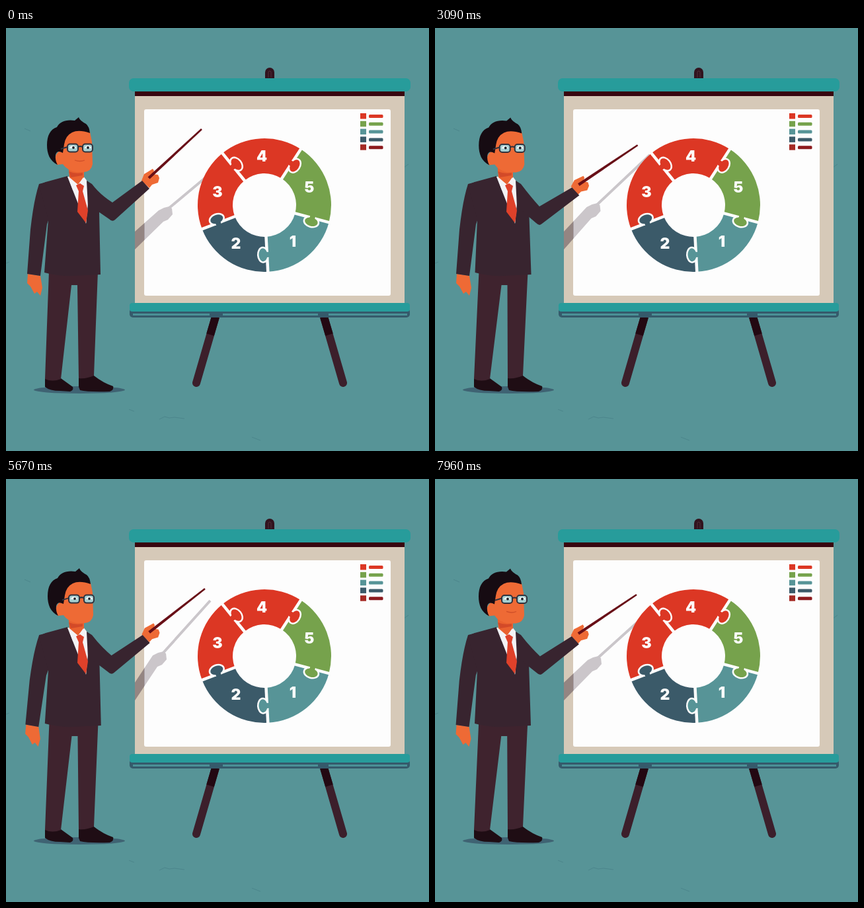
Recreate the animation shown at these times as an HTML page. Size 640 by 640 pixels, loop 8 s.

```html
<!DOCTYPE html>
<html lang="en">
<head>
<meta charset="utf-8">
<title>Presentation</title>
<style>
html, body { margin: 0; width: 100%; height: 100%; overflow: hidden; background: #579497; }
svg { display: block; width: 100%; height: 100%; }
text { font: 900 23px Inter, Roboto, sans-serif; fill: #fdfdfd; text-anchor: middle; }
</style>
</head>
<body>
<svg viewBox="0 0 640 640">
  <defs>
    <clipPath id="boardClip"><rect x="195" y="103" width="408" height="313"/></clipPath>
    <clipPath id="rimClip"><rect x="195" y="103" width="15" height="313"/></clipPath>
  </defs>
  <rect width="640" height="640" fill="#579497"/>
  <g fill="none" stroke="#487f86" stroke-width="1" opacity=".7">
    <path d="M232 592l8-4 7 2 8-1 15 2M0 356l5-2M28 152l9 4M186 577l8 3M372 619l13 5M602 211l7-5"/>
  </g>

  <!-- easel and board -->
  <g stroke-linecap="round" stroke-width="12" stroke="#3c1f2b">
    <path d="M317 437L288 537M481 437L510 537"/>
    <path d="M317 437L309 464M481 437L489 464" stroke="#230812" stroke-linecap="butt"/>
  </g>
  <path d="M392 78V67a7 7 0 0 1 14 0V78Z" fill="#32131e"/>
  <path d="M397 75V67a2 2 0 0 1 4 0V75" fill="none" stroke="#50303a"/>
  <rect x="195" y="94" width="408" height="10" fill="#38060f"/>
  <rect x="186" y="76" width="426" height="20" rx="7" fill="#279c9b"/>
  <rect x="195" y="103" width="408" height="314" fill="#d6c9b8"/>
  <rect x="209" y="123" width="373" height="282" rx="3" fill="#fdfdfd"/>
  <rect x="187" y="424" width="424" height="14" rx="5" fill="#355a6b"/>
  <rect x="187" y="416" width="424" height="13" rx="4" fill="#279c9b"/>
  <path d="M192 433.5H308M328 433.5H472M488 433.5H607" stroke="#4a9096" stroke-width="3"/>
  <g id="legend"></g>

  <g clip-path="url(#boardClip)" fill="#3a2a38" stroke="#3a2a38">
    <g opacity=".26">
      <path id="shadeArm" stroke="none"/>
    </g>
    <path id="shadeStick" stroke="#cac6ca" stroke-width="4"/>
    <path id="shadeRim" clip-path="url(#rimClip)" opacity=".22" stroke="none"/>
  </g>
  <g id="ring" transform="translate(391 268)"></g>
  <g id="numbers"></g>

  <!-- presenter -->
  <ellipse cx="111" cy="547.500" rx="69" ry="5.500" fill="#3f6373"/>
  <path d="M59 530V543Q66 549 82 549L97 550Q103 548 101 543L83 530ZM110 526V543L112 548Q124 551 157 550Q164 547 162 542Q147 537 133 526Z" fill="#1f0d14"/>
  <path id="legs" fill="#3f232e"/>
  <g id="restArm">
    <path d="M33 372L52 375L55 393L52 405L47 399L43 402L37 391L32 386Z" fill="#ee6a35"/>
    <path d="M50 236L62 233L75 260L62 297L52 375L32 372L37 305Q42 260 50 236Z" fill="#38242f"/>
  </g>
  <path id="jacket" fill="#38242f"/>
  <path d="M93 225L121 296L127 237L117 224Z" fill="#f3f3f6"/>
  <path d="M94 204H118V226L109 237L96 226Z" fill="#e9612f"/>
  <path d="M95 217Q104 221 116 219V223L98 226Z" fill="#d34a28"/>
  <path d="M94 225L107 237L101 245M117 226L109 237L120 244" fill="#f3f3f6"/>
  <path d="M106 238L112 235L118 239L116 247L124 276L121 295L108 278L110 247Z" fill="#df412a"/>

  <g id="head">
    <path d="M88 164Q92 154 106 154L127 157L130 172L131 206Q129 217 118 218H106Q92 215 86 206L77 207Q71 194 80 187Z" fill="#ee6a35"/>
    <path d="M78 207C66 201 62 190 62 177C62 163 67 153 77 150C81 142 91 138 104 140L110 135C112 140 116 142 121 145Q126 149 127 159Q110 153 100 158Q90 163 88 176L86 189Q77 184 75 192Q74 200 78 207Z" fill="#160b12"/>
    <path id="mouth" d="M104 200Q112 203 119 200" fill="none" stroke="#cf5029" stroke-width="1.300"/>
    <g id="glasses">
      <g fill="#a5cfd1" stroke="#30323d" stroke-width="2">
        <rect x="93" y="175.500" width="16" height="12" rx="4"/>
        <rect x="116" y="175.500" width="15" height="12" rx="4"/>
        <path d="M109 180Q112 178 116 180M93 180L83 183" fill="none"/>
      </g>
      <g id="eyes">
        <path d="M96 182a5 4 0 0 1 10 0ZM119 182a5 4 0 0 1 10 0Z" fill="#f5f8f8"/>
        <circle cx="102" cy="181" r="1.900" fill="#1b2028"/>
        <circle cx="124" cy="181" r="1.900" fill="#1b2028"/>
      </g>
    </g>
  </g>

  <g id="hand">
    <path d="M-13 6L-9-4L-4-7L4-12L6-9L4-4L12-3L14 2L12 9L3 12L-1 17Z" fill="#ee6a35"/>
  </g>
  <path id="arm" fill="#38242f"/>
  <path id="stick" fill="#680f17"/>
</svg>

<script>
const DURATION = 8000;
const RED = '#dc3724', GREEN = '#76a24c', TEAL = '#579497', NAVY = '#3b5a69';
const $ = id => document.getElementById(id);
const setPath = (id, d) => $(id).setAttribute('d', d);
const polygon = points => 'M' + points.map(p => p.join(' ')).join('L') + 'Z';

function buildLegend() {
  const rows = [[RED, RED], [GREEN, GREEN], [TEAL, TEAL], [NAVY, NAVY], ['#a52a24', '#8c1a1d']];
  $('legend').innerHTML = rows.map(([box, bar], i) => {
    const y = 129 + i * 11.8;
    return `<rect x="536" y="${y}" width="9" height="8.500" fill="${box}"/>
      <rect x="549" y="${y + 2}" width="21.500" height="5" rx="1.500" fill="${bar}"/>`;
  }).join('');
}

function buildRing() {
  const colors = [RED, GREEN, TEAL, NAVY, RED];
  const start = -129, step = 72, outer = 101, inner = 48;
  const at = (r, deg) => {
    const a = deg * Math.PI / 180;
    return `${r * Math.cos(a)} ${r * Math.sin(a)}`;
  };
  let sectors = '', joints = '';
  colors.forEach((color, i) => {
    const a = start + i * step, b = a + step;
    sectors += `<path fill="${color}" d="M${at(outer, a)}A${outer} ${outer} 0 0 1 ${at(outer, b)}
      L${at(inner, b)}A${inner} ${inner} 0 0 0 ${at(inner, a)}Z"/>`;
    // Each piece pushes its tab clockwise into the next one.
    joints += `<g transform="rotate(${b})" fill="${color}">
      <path d="M46 0H103" stroke="#fdfdfd" stroke-width="4.500"/>
      <ellipse cx="75" cy="6" rx="10" ry="6.500" stroke="#fdfdfd" stroke-width="5" paint-order="stroke"/>
      <rect x="71" y="-4" width="8" height="7"/></g>`;
  });
  $('ring').innerHTML = sectors + joints;
  const labels = [[4, 387, 202], [5, 459, 249], [1, 434, 331], [2, 348, 334], [3, 320, 256]];
  $('numbers').innerHTML = labels.map(([n, x, y]) => `<text x="${x}" y="${y}">${n}</text>`).join('');
}

// time, stick tip x y, grip y, head, glasses, mouth, shadow grip x y, shadow tip x y, hips, resting arm
const poses = [
  [0,    296, 153, 225, 0,   0,  1,  245, 272, 325, 207, 0,   0],
  [1000, 304, 171, 232, 3.8, .5, .5, 237, 264, 311, 186, .6,  .4],
  [2210, 308, 181, 238, 4.5, 0,  0,  243, 267, 325, 192, 3,   0],
  [4050, 305, 173, 232, 4,   1,  0,  244, 267, 325, 192, 2,   0],
  [5000, 303, 169, 231, 2,   1,  0,  240, 265, 319, 190, 1,   1.3],
  [5670, 301, 166, 230, 1,   1,  0,  236, 263, 309, 184, .8,  1.2],
  [6760, 306, 176, 234, 5.5, 0,  0,  243, 267, 318, 191, 2,   0],
  [7960, 305, 175, 232, 4,   4,  1,  245, 270, 318, 206, 2,   .2]
];

function poseAt(t) {
  const next = poses.findIndex(p => p[0] > t);
  if (next < 0) return poses[poses.length - 1];
  const a = poses[next - 1], b = poses[next];
  const k = (t - a[0]) / (b[0] - a[0]), ease = k * k * (3 - 2 * k);
  return a.map((v, i) => v + (b[i] - v) * ease);
}

function drawArm(tipX, tipY, gripY) {
  const drop = gripY - 225;
  const gripX = 218 + drop * .13, elbowX = 162 - drop * .3, elbowY = 291 + drop * .6;
  setPath('arm', `M122 231L130 236Q142 252 ${elbowX - 1} ${elbowY - 27}
    L${gripX - 12} ${gripY + 6}L${gripX - 1} ${gripY + 18}L${elbowX + 3} ${elbowY - 1}
    Q${elbowX - 1} ${elbowY + 3} ${elbowX - 6} ${elbowY - 2}L140 ${elbowY - 13}L124 270Z`);
  $('hand').setAttribute('transform', `translate(${gripX} ${gripY}) rotate(${drop * .6})`);
  const angle = Math.atan2(tipY - gripY, tipX - gripX);
  const side = (x, y, w) => [x - Math.sin(angle) * w, y + Math.cos(angle) * w];
  const x = gripX - 2, y = gripY + 2;
  setPath('stick', polygon([side(x, y, 2.2), side(tipX, tipY, 1.3), side(tipX, tipY, -1.3), side(x, y, -2.2)]));
}

function drawShadow(x, y, tipX, tipY) {
  const outline = [[-14, 4], [-6, 0], [2, -2], [6, 1], [7, 10], [0, 18], [-7, 21]]
    .map(([dx, dy]) => [x + dx, y + dy]);
  const arm = polygon([[195, 308], ...outline, [195, 335]]);
  setPath('shadeArm', arm);
  setPath('shadeRim', arm);
  setPath('shadeStick', `M${x + 1} ${y + 1}L${tipX} ${tipY}`);
}

function drawBody(hips, restArm) {
  const h = hips;
  setPath('jacket', `M93 224L60 233L50 237L64 290L${58 + h} 370Q${80 + h} 376 ${100 + h} 375
    L${143 + h} 373L${141 + h * .5} 278L128 236L117 226L122 296Z`);
  setPath('legs', `M${65 + h * .6} 368L59 531Q70 536 83 531L${99 + h * .6} 389H${108 + h * .6}
    L110 530Q122 531 133 526L${139 + h * .6} 368Z`);
  $('restArm').setAttribute('transform', `rotate(${restArm} 55 245)`);
}

function frame() {
  const t = performance.now() % DURATION;
  const [, tipX, tipY, gripY, head, glasses, mouth, shX, shY, shTipX, shTipY, hips, restArm] = poseAt(t);
  drawBody(hips, restArm);
  drawArm(tipX, tipY, gripY);
  drawShadow(shX, shY, shTipX, shTipY);
  $('head').setAttribute('transform', `translate(${head} ${head * .12})`);
  $('glasses').setAttribute('transform', `translate(${glasses})`);
  $('mouth').setAttribute('opacity', mouth);
  $('eyes').setAttribute('opacity', t > 940 && t < 1080 ? .25 : 1);
  requestAnimationFrame(frame);
}

buildLegend();
buildRing();
frame();
</script>
</body>
</html>
```
